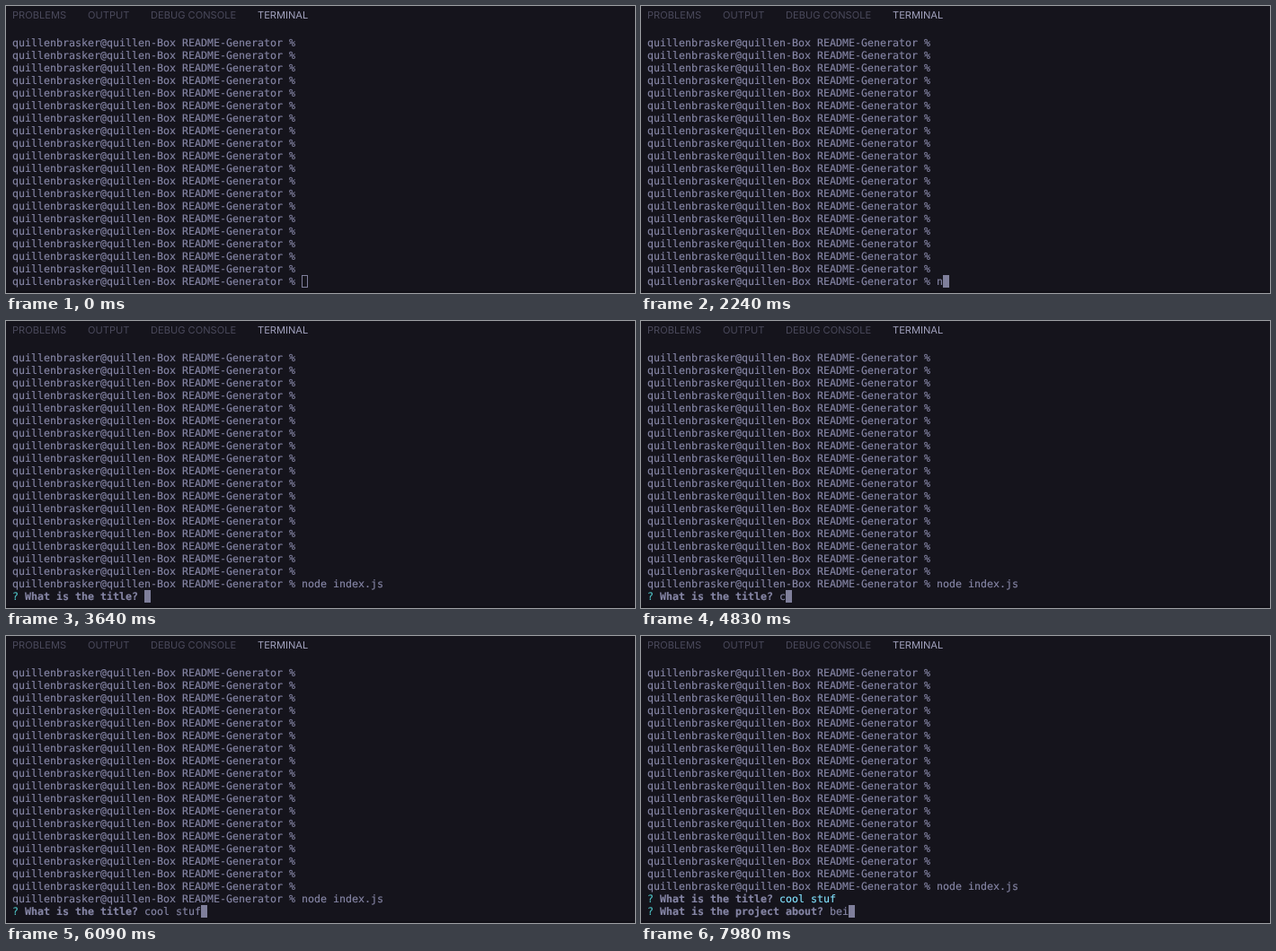
Recreate the animation shown at these times as an HTML page. Size 700x320 px, loop 8000 ms.

```html
<!DOCTYPE html>
<html lang="en">
<head>
<meta charset="utf-8">
<title>Terminal</title>
<style>
  html, body { margin: 0; width: 100%; height: 100%; overflow: hidden; background: #15141c; }
  body { position: relative; text-rendering: geometricPrecision; }
  nav span { position: absolute; top: 3px; font: 11.1px/14px Inter, sans-serif; color: #4a495b; white-space: pre; }
  nav .active { color: #a1a1bd; }
  pre {
    position: absolute; left: 7px; top: 34px; margin: 0; color: #8686a6;
    font: 11.63px/14px "DejaVu Sans Mono", monospace; font-variant-ligatures: none;
    -webkit-text-stroke: .15px;
  }
  pre div { height: 14px; }
  i { color: #4fc3c6; font-style: normal; }
  em { color: #82e2ff; font-style: normal; }
  #cursor {
    position: absolute; top: 300px; width: 7px; height: 14px; box-sizing: border-box;
    border: 1px solid #7f7f9b;
  }
  #cursor.focused { background: #7f7f9b; }
  footer { position: absolute; left: 0; right: 0; top: 318px; height: 2px; background: #100f16; }
</style>
</head>
<body>
<nav>
  <span style="left:7px">PROBLEMS</span>
  <span style="left:91px">OUTPUT</span>
  <span style="left:161px">DEBUG CONSOLE</span>
  <span style="left:280px" class="active">TERMINAL</span>
</nav>
<pre id="screen"></pre>
<div id="cursor"></div>
<footer></footer>
<script>
const LOOP = 8000, ROWS = 20, CELL = 7, LEFT = 7, FOCUS_AT = 280;
const PROMPT = 'quillenbrasker@quillen-Box README-Generator % ';

// [time in ms, text that appears]
const output = [
  [2240, 'n'], [2450, 'o'], [2590, 'd'], [2730, 'e'], [2800, ' '], [3010, 'i'], [3150, 'ndex.js '],
  [3360, '\n'], [3640, '? What is the title? '],
  [4830, 'c'], [4900, 'o'], [5040, 'o'], [5250, 'l'], [5530, ' '],
  [5600, 's'], [5880, 't'], [5950, 'u'], [6090, 'f'],
  [6440, '\n? What is the project about? '],
  [7770, 'b'], [7840, 'e'], [7980, 'i'],
];

const screen = document.getElementById('screen');
const cursor = document.getElementById('cursor');
let shown = null;

function lineHTML(line, i, lines) {
  const answerTag = i < lines.length - 1 ? 'em' : 'span';
  const html = line.replace(/^\? (.*\?) (.*)$/, `<i>?</i> <b>$1</b> <${answerTag}>$2</${answerTag}>`);
  return `<div>${html}</div>`;
}

function draw() {
  const t = performance.now() % LOOP;
  const text = PROMPT + output.filter(([time]) => time <= t).map(([, s]) => s).join('');
  cursor.className = t >= FOCUS_AT ? 'focused' : '';
  if (text !== shown) {
    shown = text;
    const typed = text.split('\n');
    const lines = [...Array(ROWS - typed.length).fill(PROMPT), ...typed];
    screen.innerHTML = lines.map(lineHTML).join('');
    cursor.style.left = LEFT + CELL * typed.at(-1).length + 'px';
  }
  requestAnimationFrame(draw);
}
draw();
</script>
</body>
</html>
```
